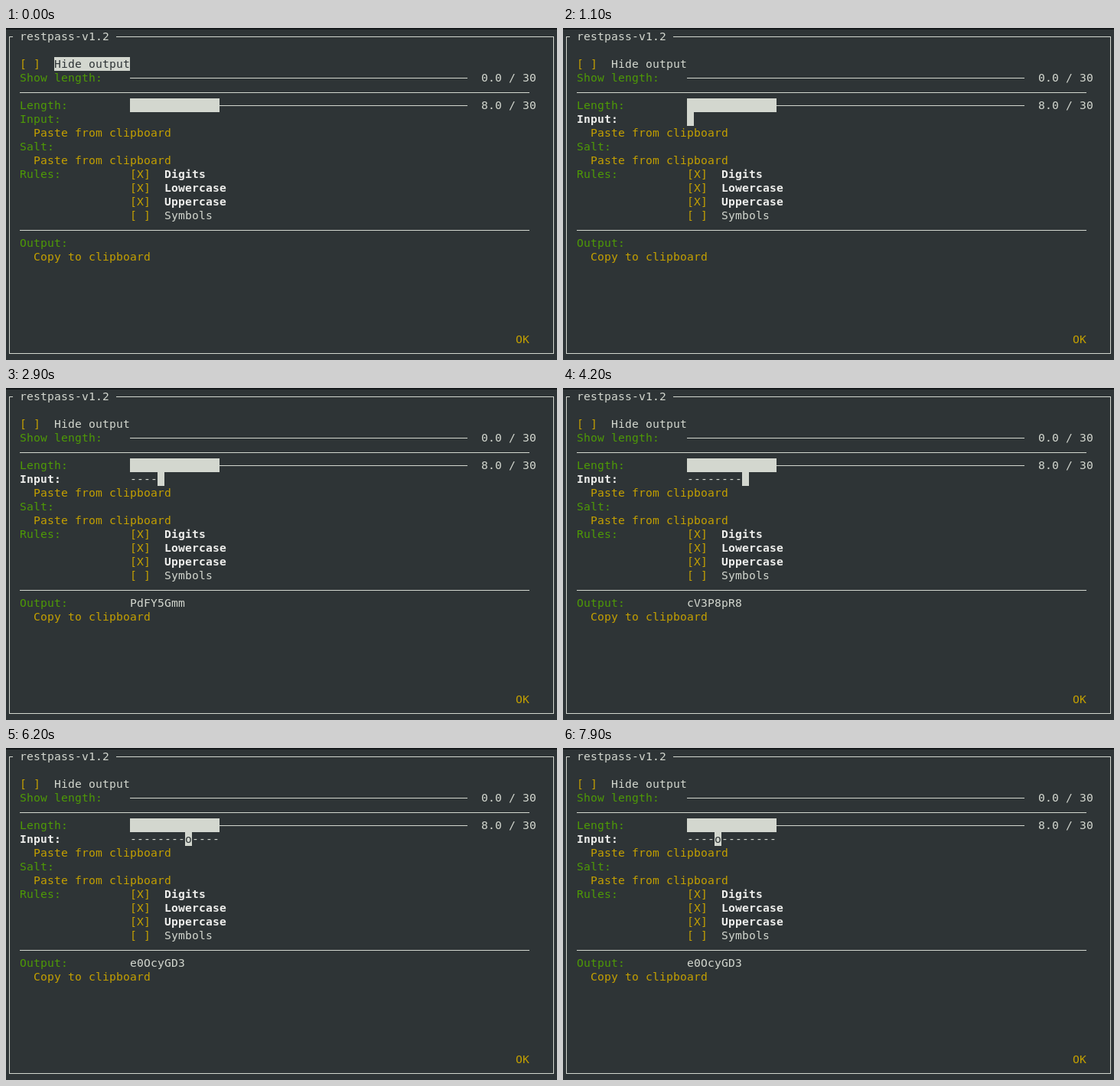
An HTML page for the animation above (8 s loop, 720 px wide and 434 px high).

```html
<!DOCTYPE html>
<html lang="en">
<head>
<meta charset="utf-8">
<title>Password form</title>
<style>
  html, body { margin: 0; width: 100%; height: 100%; overflow: hidden; background: #2e3436; }
  svg { display: block; width: 720px; height: 434px; }
  text { font: 14.667px "DejaVu Sans Mono", monospace; white-space: pre; }
  .bold { font-weight: bold; }
</style>
</head>
<body>
<svg id="stage" viewBox="0 0 720 434"></svg>
<script>
const LOOP = 8000;
const CW = 9, CH = 18, TOP = 2;
const BG = '#2e3436', FG = '#d3d7cf', BRIGHT = '#eeeeec', GREEN = '#4e9a06', GOLD = '#c4a000';
const SECRET = 'Hello, World!';

// Each list holds [start ms, value]; values change abruptly.
const FOCUS = [[0, 'hide'], [500, 'show'], [700, 'rule'], [900, 'length'], [1100, 'input']];
const TYPED = [0, 2000, 2300, 2600, 2900, 3200, 3500, 3900, 4200, 4300, 4500, 4700, 4900, 5200]
  .map((ms, n) => [ms, n]);
const CARET = [[5600, 12], [6100, 11], [6200, 8], [6300, 5], [6400, 3], [6600, 2], [6800, 1],
  [7000, 0], [7300, 1], [7500, 2], [7700, 3], [7900, 4]];
const OUTPUT = [[0, ''], [2100, 'R4kTn2Xd'], [2400, 'b8ZLs0hE'], [2600, 'PdFY5Gmm'], [3000, 'h3gKv9Ra'],
  [3200, 'N6tBx1cU'], [3600, 'k2MsD7fH'], [4000, 'E9uLw4Tz'], [4200, 'cV3P8pR8'], [4400, 'n5HyC0eM'],
  [4500, 'W7qaS3Kd'], [4800, 'D1xgF6Bv'], [4900, 'fw8l5w2l'], [5300, 'e0OcyGD3']];

const at = (list, t) => list.reduce((v, [ms, val]) => t >= ms ? val : v, undefined);
const rect = (x, y, w, h, fill = FG) =>
  `<rect x="${x}" y="${y}" width="${w}" height="${h}" fill="${fill}"/>`;
const cells = (col, row, n, fill) => rect(col * CW, TOP + row * CH, n * CW, CH, fill);
const rowLine = (col, row, n, fill, dy = 9) => rect(col * CW, TOP + row * CH + dy, n * CW, 1, fill);

function text(col, row, str, fill = FG, bold = false) {
  if (!str) return '';
  const xs = [...str].map((_, i) => (col + i) * CW).join(' ');
  return `<text x="${xs}" y="${TOP + row * CH + 14}" fill="${fill}"${bold ? ' class="bold"' : ''}>${str}</text>`;
}

const label = (row, str, focused) => text(2, row, str, focused ? BRIGHT : GREEN, focused);

function slider(row, name, value, focused) {
  const fill = focused ? BRIGHT : FG;
  const filled = Math.floor(value / 30 * 49);
  return label(row, name, focused) + rowLine(18, row, 49, fill) +
    (filled ? cells(18, row, filled, fill) : '') +
    text(69, row, value.toFixed(1) + ' / 30');
}

function separator(row, focused) {
  return (focused ? cells(2, row, 74, FG) : '') + rowLine(2, row, 74, focused ? BG : FG, 10);
}

function hideOption(focused) {
  return text(2, 2, '[ ]', GOLD) + (focused ? cells(7, 2, 11, FG) : '') +
    text(7, 2, 'Hide output', focused ? BG : FG);
}

function input(focused, typed, caret) {
  let out = label(6, 'Input:', focused) + text(18, 6, '-'.repeat(typed));
  if (focused) {
    out += cells(18 + caret, 6, 1, FG);
    if (caret < typed) out += text(18 + caret, 6, SECRET[caret], BG);
  }
  return out;
}

function frame() {
  return rect(0, 0, 720, 434, BG) + rect(0, 0, 720, 2, '#14191b') +
    rect(4, 11, 5, 1) + text(2, 0, 'restpass-v1.2') + rect(144, 11, 572, 1) +
    rect(4, 11, 1, 415) + rect(715, 11, 1, 415) + rect(4, 425, 712, 1);
}

function rules() {
  return label(10, 'Rules:') + ['Digits', 'Lowercase', 'Uppercase', 'Symbols'].map((name, i) => {
    const on = i < 3;
    return text(18, 10 + i, on ? '[X]' : '[ ]', GOLD) + text(23, 10 + i, name, on ? BRIGHT : FG, on);
  }).join('');
}

const fixed = frame() + text(4, 7, 'Paste from clipboard', GOLD) + label(8, 'Salt:') +
  text(4, 9, 'Paste from clipboard', GOLD) + rules() + separator(14) + label(15, 'Output:') +
  text(4, 16, 'Copy to clipboard', GOLD) + text(74, 22, 'OK', GOLD);

const stage = document.getElementById('stage');
let last = '';

function draw(t) {
  const focus = at(FOCUS, t), typed = at(TYPED, t);
  const caret = at(CARET, t) ?? typed;
  const output = at(OUTPUT, t);
  const key = [focus, typed, caret, output].join();
  if (key === last) return;
  last = key;
  stage.innerHTML = fixed + hideOption(focus === 'hide') +
    slider(3, 'Show length:', 0, focus === 'show') + separator(4, focus === 'rule') +
    slider(5, 'Length:', 8, focus === 'length') +
    input(focus === 'input', typed, caret) + text(18, 15, output);
}

const start = performance.now();
function tick() {
  draw((performance.now() - start) % LOOP);
  requestAnimationFrame(tick);
}
tick();
</script>
</body>
</html>
```
